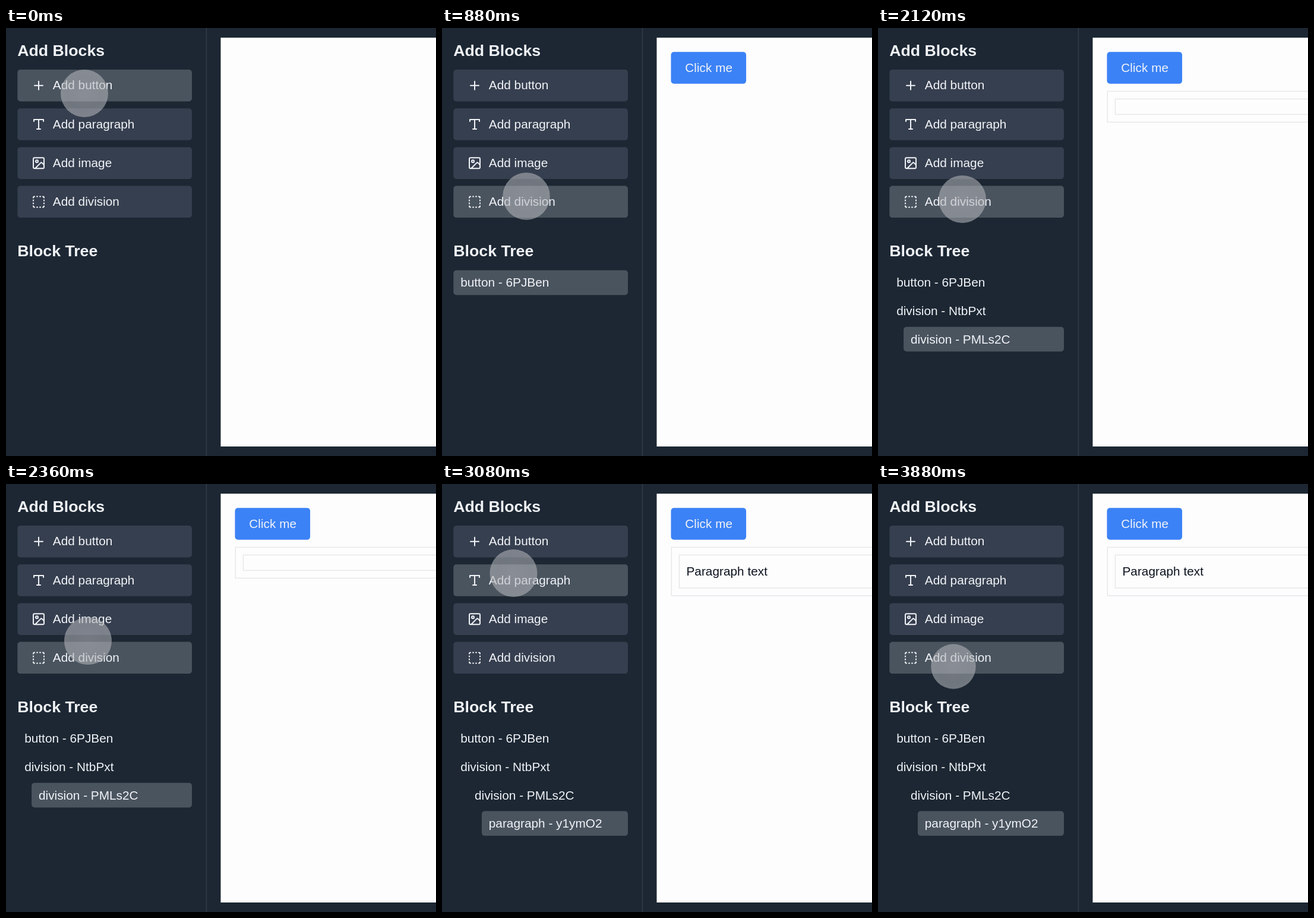
An HTML page for the animation above (3920 ms loop, 724x720 px).

```html
<!DOCTYPE html>
<html lang="en">
<head>
<meta charset="utf-8">
<title>Block editor</title>
<style>
  html, body { margin: 0; width: 100%; height: 100%; overflow: hidden; background: #1c2733; }
  svg { display: block; font: 20.8px "Liberation Sans", Arial, sans-serif; }
  text { white-space: pre; }
  .title { font-size: 26.7px; font-weight: bold; }
  .icon { fill: none; stroke: #f1f3f7; stroke-width: 2; stroke-linecap: round; stroke-linejoin: round; }
</style>
</head>
<body>
<svg id="stage" width="724" height="720" viewBox="0 0 724 720">
  <defs>
    <radialGradient id="touch">
      <stop offset="0" stop-color="#bbbbc1" stop-opacity=".56"/>
      <stop offset=".7" stop-color="#b4b6bb" stop-opacity=".55"/>
      <stop offset="1" stop-color="#b2b4b8" stop-opacity=".58"/>
    </radialGradient>
  </defs>
  <path d="M337.5 0V720" stroke="#303c48" stroke-width="1.5"/>
  <rect x="361.5" y="16.3" width="370" height="687.7" fill="#fdfdfd"/>
  <g id="scene"></g>
  <circle id="cursor" fill="url(#touch)"/>
</svg>
<script>
const LOOP = 3920;
const LIGHT = '#f1f3f7', IDLE = '#363f4f', ACTIVE = '#4a545f', BORDER = '#e5e7ea';
const scene = document.getElementById('scene');
const cursor = document.getElementById('cursor');

const menu = [
  ['Add button', 'M5 12h14M12 5v14'],
  ['Add paragraph', 'M4 7V4h16v3M9 20h6M12 4v16'],
  ['Add image', 'M5 3h14a2 2 0 0 1 2 2v14a2 2 0 0 1-2 2H5a2 2 0 0 1-2-2V5a2 2 0 0 1 2-2z' +
    'M11 9a2 2 0 1 1-4 0a2 2 0 1 1 4 0M21 15l-3.1-3.1a2 2 0 0 0-2.8 0L6 21'],
  ['Add division', 'M5 3a2 2 0 0 0-2 2M19 3a2 2 0 0 1 2 2M21 19a2 2 0 0 1-2 2M5 21a2 2 0 0 1-2-2' +
    'M9 3h1M9 21h1M14 3h1M14 21h1M3 9v1M21 9v1M3 14v1M21 14v1']
];

// label, nesting depth, time added
const blocks = [
  ['button - 6PJBen', 0, 340],
  ['division - NtbPxt', 0, 1100],
  ['division - PMLs2C', 1, 1500],
  ['paragraph - y1ymO2', 2, 2760]
];

const presses = [320, 1080, 1480, 2740, 3990];

// time, x, y
const path = [
  [0, 132, 110], [300, 145, 107], [480, 145, 107], [820, 142, 283], [2120, 142, 288],
  [2260, 142, 288], [2640, 119, 150], [3310, 121, 150], [3770, 127, 307], [LOOP, 127, 307]
];

const rect = (x, y, w, h, fill, stroke = 'none', r = 5) =>
  `<rect x="${x}" y="${y}" width="${w}" height="${h}" rx="${r}" fill="${fill}" stroke="${stroke}" stroke-width="1.4"/>`;
const label = (x, y, str, fill = LIGHT, cls = '') =>
  `<text x="${x}" y="${y}" fill="${fill}" class="${cls}">${str}</text>`;

function pointer(t) {
  const i = path.findIndex(p => p[0] > t);
  const [t0, x0, y0] = path[i - 1], [t1, x1, y1] = path[i];
  const u = (t - t0) / (t1 - t0), e = u * u * (3 - 2 * u);
  const dip = presses.reduce((sum, c) => sum + Math.exp(-(((t - c) / 110) ** 2)), 0);
  return { x: x0 + (x1 - x0) * e, y: y0 + (y1 - y0) * e, r: 40 - 6.2 * dip };
}

function sidebar(hotY, added) {
  let out = label(19.3, 46.5, 'Add Blocks', LIGHT, 'title') + label(19.3, 384, 'Block Tree', LIGHT, 'title');
  menu.forEach(([name, icon], i) => {
    const y = 70 + i * 65.2;
    const hover = hotY >= y && hotY <= y + 53.5;
    out += rect(19.3, y, 293.7, 53.5, hover ? ACTIVE : IDLE) + label(78.8, y + 33.4, name) +
      `<path class="icon" d="${icon}" transform="translate(43 ${y + 14.8})"/>`;
  });
  blocks.slice(0, added).forEach(([name, depth], i) => {
    const x = 19.3 + depth * 23.8, y = 407.6 + i * 47.55;
    if (i === added - 1) out += rect(x, y, 313 - x, 41.6, ACTIVE);
    out += label(x + 11.9, y + 27.8, name);
  });
  return out;
}

function preview(added) {
  let out = '';
  const inner = added > 3 ? 55.5 : 26;
  const outer = added > 2 ? inner + 26 : 26;
  if (added > 0) out += rect(385.5, 40.2, 126.6, 53.5, '#3b82f6') + label(409.3, 73.5, 'Click me');
  if (added > 1) out += rect(386.3, 106.4, 400, outer, 'none', BORDER, 0);
  if (added > 2) out += rect(399.5, 119.4, 400, inner, 'none', BORDER, 0);
  if (added > 3) out += label(411.5, 153.6, 'Paragraph text', '#0c1320');
  return out;
}

let shown = '';
function frame(now) {
  const t = now % LOOP;
  const { x, y, r } = pointer(t);
  const added = blocks.filter(b => t >= b[2]).length;
  const markup = sidebar(y + 11, added) + preview(added);
  if (markup !== shown) scene.innerHTML = shown = markup;
  cursor.setAttribute('cx', x);
  cursor.setAttribute('cy', y);
  cursor.setAttribute('r', r);
  requestAnimationFrame(() => frame(performance.now() - start));
}
const start = performance.now();
frame(0);
</script>
</body>
</html>
```
